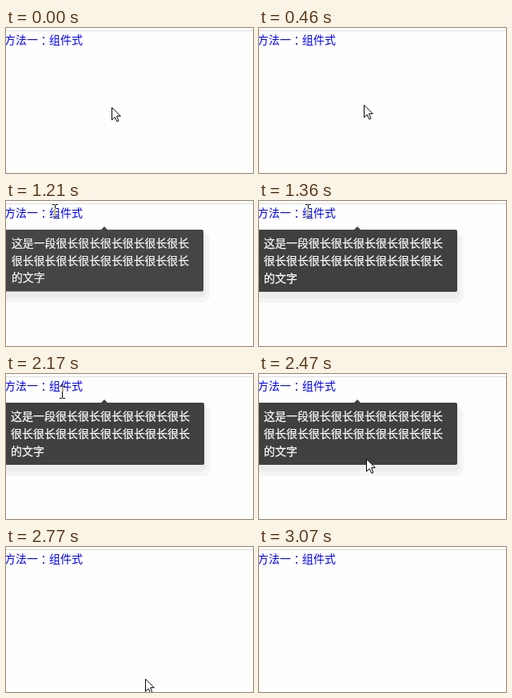
Recreate the animation shown at these times as an HTML page with a canvas. Size 309 by 182 pixels, loop 3220 ms.

```html
<!DOCTYPE html>
<html lang="zh-CN">
<head>
<meta charset="utf-8">
<title>Tooltip</title>
<style>
html, body { margin: 0; width: 100%; height: 100%; overflow: hidden; background: #fefefe; }
canvas { display: block; }
</style>
</head>
<body>
<canvas id="stage" width="309" height="182"></canvas>
<script>
const ctx = document.getElementById('stage').getContext('2d');
const LOOP = 3220;
const FONT = '14px "Noto Sans CJK SC", "Noto Sans CJK", sans-serif';

// Pointer samples: start time, kind, left, top
const POINTER = [
  [0, 'arrow', 132, 99], [460, 'arrow', 131, 96], [610, 'arrow', 114, 84],
  [760, 'arrow', 95, 68], [910, 'arrow', 74, 38], [1060, 'beam', 59, 5],
  [1210, 'beam', 58, 4], [2170, 'beam', 67, 15], [2320, 'arrow', 95, 37],
  [2470, 'arrow', 134, 106], [2620, 'arrow', 167, 157], [2770, 'arrow', 174, 165],
  [2920, 'arrow', 179, 167], [3070, 'none', 0, 0]
];

// Tooltip states: start time, opacity, scale
const TOOLTIP = [
  [0, 0, 1], [1210, 0.97, 0.992], [1360, 1, 1], [2620, 0.95, 0.992], [2770, 0, 1]
];

const LINES = ['这是一段' + '很长'.repeat(6), '很长'.repeat(8), '的文字'];

const stateAt = (list, t) => list.filter(s => s[0] <= t).pop();

function polygon(points) {
  ctx.beginPath();
  points.forEach(([x, y]) => ctx.lineTo(x, y));
  ctx.closePath();
}

function roundBox(x, y, w, h, r, color) {
  ctx.beginPath();
  ctx.roundRect(x, y, w, h, r);
  ctx.fillStyle = color;
  ctx.fill();
}

function drawPage() {
  ctx.fillStyle = '#fefefe';
  ctx.fillRect(0, 0, 309, 182);
  ctx.fillStyle = '#dcdcdc';
  ctx.fillRect(0, 3, 309, 1);

  ctx.fillStyle = '#0000ff';
  ctx.fillText('方法一', -2, 20);
  ctx.fillText('组件式', 54, 20);
  // Centre the colon's ink in its cell
  const m = ctx.measureText('：');
  ctx.fillText('：', 47 - (m.actualBoundingBoxRight - m.actualBoundingBoxLeft) / 2, 20);
}

function drawTooltip(alpha, scale) {
  if (!alpha) return;
  ctx.save();
  ctx.globalAlpha = alpha;
  ctx.translate(123, 36);
  ctx.scale(scale, scale);
  ctx.translate(-123, -36);

  // Stepped shadow
  roundBox(-10, 40, 266, 88, 9, 'rgba(0, 0, 0, 0.035)');
  roundBox(-6, 40, 257, 82, 6, 'rgba(0, 0, 0, 0.035)');

  roundBox(-2, 36, 250, 78, 2, '#404040');
  polygon([[119, 36], [123, 32], [127, 36]]);
  ctx.fill();

  ctx.fillStyle = ctx.strokeStyle = '#fff';
  ctx.lineWidth = 0.25;
  LINES.forEach((line, i) => {
    ctx.fillText(line, 6, 58 + 22 * i);
    ctx.strokeText(line, 6, 58 + 22 * i);
  });
  ctx.restore();
}

function drawArrow() {
  polygon([[0.5, 0.8], [0.5, 16.3], [4.2, 12.9], [6.9, 18.5], [9, 17.6], [6.6, 11.7], [11.3, 11.6]]);
  ctx.fillStyle = '#fff';
  ctx.fill();
  ctx.strokeStyle = '#000';
  ctx.lineWidth = 1;
  ctx.stroke();
}

function drawBeam() {
  ctx.globalCompositeOperation = 'difference';
  ctx.fillStyle = '#fff';
  for (const y of [0, 15]) {
    ctx.fillRect(0, y, 3, 1);
    ctx.fillRect(4, y, 3, 1);
  }
  ctx.fillRect(3, 1, 1, 14);
}

function drawPointer(kind, x, y) {
  ctx.save();
  ctx.translate(x, y);
  if (kind === 'arrow') drawArrow();
  if (kind === 'beam') drawBeam();
  ctx.restore();
}

function render(now) {
  const t = now % LOOP;
  ctx.font = FONT;
  drawPage();
  drawTooltip(...stateAt(TOOLTIP, t).slice(1));
  drawPointer(...stateAt(POINTER, t).slice(1));
}

let start = null;
function tick(now) {
  if (start === null) start = now;
  render(now - start);
  requestAnimationFrame(tick);
}
render(0);
requestAnimationFrame(tick);
</script>
</body>
</html>
```
